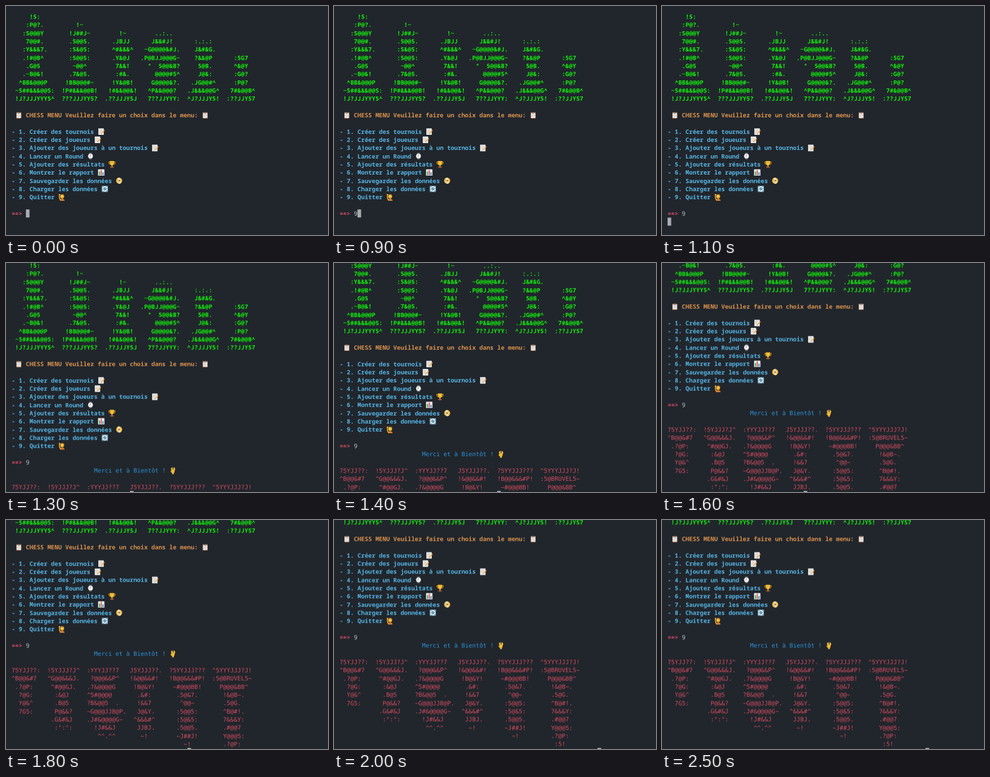
Animation, 600 px wide and 428 px high, one loop 2800 ms. Source, as an HTML page:

```html
<!DOCTYPE html>
<html lang="fr">
<head>
<meta charset="utf-8">
<title>Chess menu</title>
<style>
  html, body { margin: 0; width: 100%; height: 100%; overflow: hidden; background: #21262c; }
  svg.stage { display: block; width: 100vw; height: 100vh; overflow: hidden; }
  text {
    font: 11.13px "DejaVu Sans Mono", "Noto Sans Mono", monospace;
    text-rendering: geometricPrecision;
  }
  .art, .title, .menu, .prompt {
    font-family: "Noto Sans Mono", "DejaVu Sans Mono", monospace;
    font-weight: 700;
  }
  .art { fill: #14ec10; }
  .title { fill: #d9924f; }
  .menu { fill: #56b4e4; }
  .prompt { fill: #e04c66; }
  .typed { fill: #b4b8bc; }
  .bye { fill: #2c93d8; }
  .end { fill: #d04c62; }
</style>
</head>
<body>
<svg class="stage" viewBox="0 0 600 428">
  <defs>
    <symbol id="board" viewBox="0 0 14 14">
      <rect x="2" y="1.8" width="10" height="11.8" rx="1" fill="#a9673f"/>
      <rect x="3" y="3" width="8" height="9.6" fill="#f2f2f2"/>
      <path d="M4.2 6h5.600M4.200 8h5.600M4.200 10h5.600" stroke="#a9adb1" stroke-width=".7"/>
      <path d="M4.500 4.200V2.600h1.400a1.100 1.100 0 0 1 2.200 0h1.400v1.600z" fill="#8b959b"/>
    </symbol>
    <symbol id="note" viewBox="0 0 14 14">
      <path d="M1.500 1h10.300v12.500H1.500z" fill="#f2f2f2"/>
      <path d="M3 3.500h6.500M3 5.500h5.500M3 7.500h4M3 9.500h3" stroke="#a6adb2" stroke-width=".7"/>
      <path d="M6.200 11.500l.7-2.200 5.300-5.200 1.400 1.400-5.300 5.300z" fill="#f3a72e"/>
      <path d="M12.200 4.100l.6-.6 1.200 1.400-.4.600z" fill="#e4595b"/>
      <path d="M6.200 11.500l.4-1.300 1 .9z" fill="#444"/>
    </symbol>
    <symbol id="watch" viewBox="0 0 14 14">
      <path d="M4.500 .5h5l.8 3.500H3.700zM3.700 10h6.600l-.8 3.500h-5z" fill="#59636a"/>
      <circle cx="7" cy="7" r="4.900" fill="#aab2b6"/>
      <circle cx="7" cy="7" r="4.100" fill="#f6f6f6"/>
      <path d="M7 4.700V7H4.900" fill="none" stroke="#555" stroke-width=".7"/>
    </symbol>
    <symbol id="cup" viewBox="0 0 14 14">
      <path d="M3.500 2.500H1c0 3 1.200 4.600 3.500 4.800M10.500 2.500H13c0 3-1.200 4.600-3.500 4.800" fill="none" stroke="#f2a72e" stroke-width="1.200"/>
      <path d="M2.800 .7h8.400c0 4.800-1.100 7.300-3.200 8.300v2H6V9C3.900 8 2.800 5.500 2.800 .7z" fill="#fbc02d"/>
      <path d="M3.700 11h6.600v2.800H3.700z" fill="#9a5b35"/>
    </symbol>
    <symbol id="chart" viewBox="0 0 14 14">
      <rect x=".9" y=".9" width="12.200" height="12.200" rx=".6" fill="#eceff1"/>
      <path d="M2.700 5h2v7.300h-2z" fill="#3c9c4c"/>
      <path d="M6 2.300h2v10H6z" fill="#e2483d"/>
      <path d="M9.300 6.500h2v5.800h-2z" fill="#2f80d0"/>
    </symbol>
    <symbol id="disc" viewBox="0 0 14 14">
      <circle cx="7" cy="7" r="5.800" fill="#f0bd55"/>
      <path d="M7 7L3.500 2.400a5.800 5.800 0 0 1 4.600-1.100zM7 7l3.500 4.600a5.800 5.800 0 0 1-4.600 1.100z" fill="#fbe7ad"/>
      <circle cx="7" cy="7" r="2.300" fill="#f7f1df"/>
      <circle cx="7" cy="7" r="1.300" fill="#3a3a3a"/>
    </symbol>
    <symbol id="sync" viewBox="0 0 14 14">
      <rect x=".9" y=".9" width="12.200" height="12.200" rx="1.200" fill="#6b9cb4"/>
      <path d="M2.800 7.300A4.200 4.200 0 0 1 9.900 4M11.200 6.700A4.200 4.200 0 0 1 4.100 10" fill="none" stroke="#fff" stroke-width="1.500"/>
      <path d="M8.300 5.700h3.200V2.500zM5.700 8.300H2.500v3.200z" fill="#fff"/>
    </symbol>
    <symbol id="raise" viewBox="0 0 14 14">
      <path d="M3.500 14c0-2.600 1.600-3.600 4-3.600s4.700.8 4.700 3.600z" fill="#e8812e"/>
      <path d="M4.500 13L2.500 9V4" fill="none" stroke="#f4b52f" stroke-width="1.800"/>
      <circle cx="2.600" cy="2.800" r="1.500" fill="#fbc63b"/>
      <circle cx="7.800" cy="5.300" r="4" fill="#9a6232"/>
      <ellipse cx="7.600" cy="6.200" rx="3.100" ry="3.700" fill="#fbc63b"/>
      <path d="M6.200 8q1.400 1.100 2.800 0" fill="none" stroke="#7a4526" stroke-width=".7"/>
    </symbol>
    <symbol id="salute" viewBox="0 0 14 14">
      <path d="M5 8L3.900 2.800M6.400 7L5.700 1.500M8.200 7l1-5.500M9.400 8l1.300-4.700M5.400 11L3 8.400" fill="none" stroke="#fbc63b" stroke-width="1.600" stroke-linecap="round"/>
      <path d="M4.400 6.500h5.700c.4 3-.5 4.500-1.400 5.500v2H5.600v-2C4.500 11 4.200 9 4.400 6.500z" fill="#f6b933"/>
    </symbol>
  </defs>
  <g id="page"></g>
  <rect id="cursor" width="6.700" height="15" fill="#a9adb1"/>
</svg>
<script>
const LOOP = 2800, LEFT = 10.4, CELL = 6.678, ROW = 15.33;
const NS = "http://www.w3.org/2000/svg";
const page = document.getElementById("page");
const colX = c => LEFT + c * CELL;
const rowTop = r => 12.3 + r * ROW;

const banner = `
     !5:
    :P@?.         !~
   :5@@@Y       !J##J~        !~        ..:..
    7@@#.       .5@@5.      .JBJJ      J&&#J!      :.:.:
   :Y&&&7.      :5&@5:      ^#&&&^   ~G@@@@&#J.    J&#&G.
   .!#@B^       :5@@5:      .Y&@J   .P@BJJ@@@G~    ?&&@P      :5G7
    .G@5         ~@@^        7&&!     °  5@@&B?     5@B.      ^&@Y
   .~B@&!       .7&@5.       :#&.       @@@@#5^     J@&:      :G@?
  ^BB&@@@P     !BB@@@#~     !Y&@B!     G@@@@&?.   .JG@@#^     :P@?
 ~5##&&&@@5:  !P#&&&@@B!   !#&&@@&!   ^P&&@@@?   .J&&&@@G^   7#&@@B^
 !J?JJJYYY5^  ???JJJYY5?  .??JJJY5J   7??JJYYY:  ^J?JJJY5!  :??JJY57`;

const farewell = `
75YJJ??:  !5YJJJ?J^  :YYYJJ??7   J5YJJJ??.  ?5YYJJJ???  ^5YYYJJJ?J!
^B@@&#7   ^G@@&&&J.   ?@@@&&P^   !&@@&&#!   !B@@&&&#P!  :5@BRUVEL5~
 .?@P:     ^#@@GJ.   .?&@@@@G     !B@&Y!     ~#@@@BB!     P@@@&BB^
  ?@G:      :&@J     ^5#@@@@       .&#:       .5@&7.       !&@B~.
  Y@&^      .B@5     ?B&@@5  .     !&&7        ^@@~        .5@G.
  7G5:      P@&&?    ~G@@@JJB@P.   J@&Y.      :5@@5:       ^B@#!.
           .G&#&J    .J#&@@@@G~   ^&&&#^      :5@&5:       7&&&Y:
            :°:°:      !J#&&J      JJBJ.      .5@@5.       .#@@7
                        ^^.^^       ~!        ~J##J!       Y@@@5:
                                                ~!         .?@P:
                                                            :5!`;

const menu = [
  ["Créer des tournois", "note"],
  ["Créer des joueurs", "note"],
  ["Ajouter des joueurs à un tournois", "note"],
  ["Lancer un Round", "watch"],
  ["Ajouter des résultats", "cup"],
  ["Montrer le rapport", "chart"],
  ["Sauvegarder les données", "disc"],
  ["Charger les données", "sync"],
  ["Quitter", "raise"]
];

function add(parent, tag, attrs) {
  const el = document.createElementNS(NS, tag);
  for (const k in attrs) el.setAttribute(k, attrs[k]);
  return parent.appendChild(el);
}

// Each word starts on its own terminal column.
function write(row, line, cls, parent = page) {
  const text = add(parent, "text", { class: cls, y: rowTop(row) + 11.8 });
  for (const m of line.matchAll(/\S+/g))
    add(text, "tspan", { x: colX(m.index) }).textContent = m[0];
}

function icon(row, col, id, parent = page) {
  add(parent, "use", {
    href: "#" + id, x: colX(col), y: rowTop(row) + 0.8, width: 13.6, height: 13.6
  });
}

const block = (row, art, cls) =>
  art.slice(1).split("\n").forEach((line, i) => write(row + i, line, cls));

block(0, banner, "art");
write(12, "    CHESS MENU Veuillez faire un choix dans le menu:", "title");
icon(12, 1, "board");
icon(12, 53, "board");
menu.forEach(([label, id], i) => {
  const line = `- ${i + 1}. ${label}`;
  write(14 + i, line, "menu");
  icon(14 + i, line.length + 1, id);
});
write(24, "==>", "prompt");
const typed = add(page, "g");
write(24, "    9", "typed", typed);
const bye = add(page, "g");
write(25, " ".repeat(23) + "Merci et à Bientôt !", "bye", bye);
icon(25, 44, "salute", bye);
block(27, farewell, "end");

// time, rows scrolled, cursor column, cursor row
const steps = [
  [0, 0, 4, 24],
  [900, 0, 5, 24],
  [1100, 0, 0, 25],
  [1200, 0, 46, 25],
  [1300, 1, 33, 27],
  [1400, 3, 44, 27],
  [1500, 6, 5, 27],
  [1600, 8, 38, 27],
  [1700, 9, 43, 27],
  [1800, 10, 49, 27],
  [1900, 11, 54, 27],
  [2000, 11, 72, 27]
];

function hold(el, frames) {
  const keys = frames.map(([t, props]) => ({ offset: t / LOOP, easing: "steps(1, end)", ...props }));
  keys.push({ ...keys[keys.length - 1], offset: 1 });
  el.animate(keys, { duration: LOOP, iterations: Infinity }).startTime = 0;
}

const move = (x, y) => ({ transform: `translate(${x}px, ${y}px)` });
const showAt = (el, t) => hold(el, [[0, { opacity: 0 }], [t, { opacity: 1 }]]);

hold(page, steps.map(([t, up]) => [t, move(0, -up * ROW)]));
hold(document.getElementById("cursor"),
  steps.map(([t, , col, row]) => [t, move(colX(col), rowTop(row))]));
showAt(typed, 900);
showAt(bye, 1200);
</script>
</body>
</html>
```
